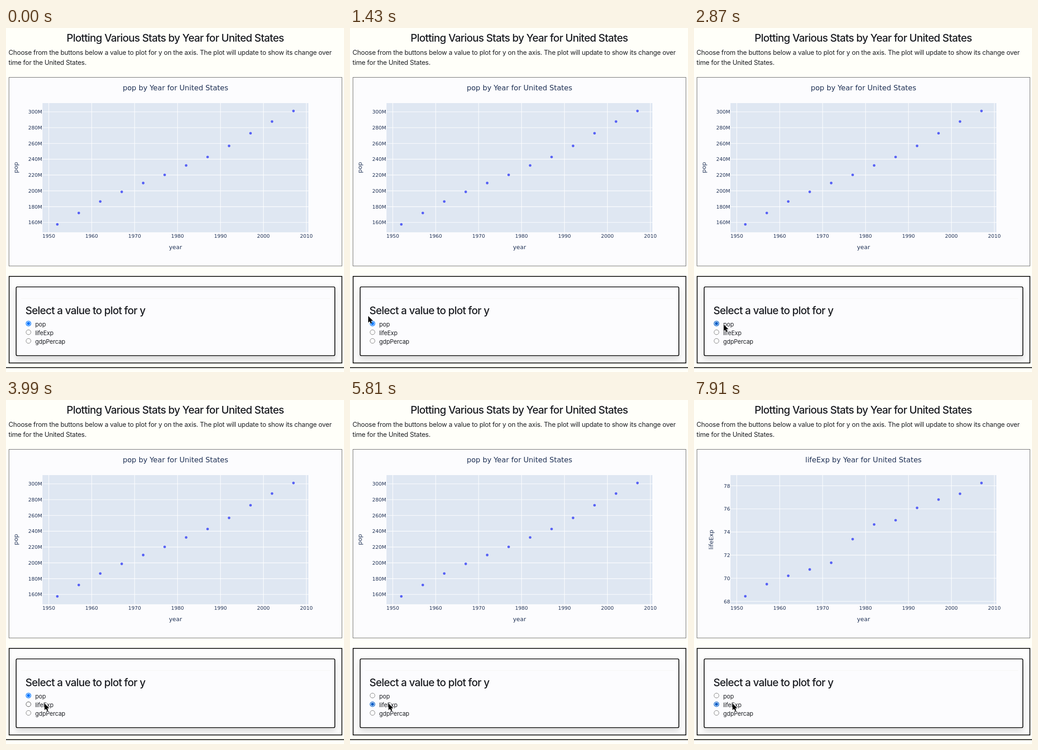
Animation, 741 px wide and 756 px high, one loop 8000 ms. Source, as an HTML page:

```html
<!DOCTYPE html>
<html lang="en">
<head>
<meta charset="utf-8">
<title>Stats by Year</title>
<style>
  html, body { margin: 0; width: 100%; height: 100%; overflow: hidden; background: #fffff9; }
  svg { display: block; }
  text { font-family: Inter, sans-serif; font-optical-sizing: none; fill: #1b1d22; }
  .heading { font-size: 23px; font-weight: 500; letter-spacing: -0.8px; }
  .body { font-size: 14.3px; letter-spacing: -0.19px; }
  .option { font-size: 13px; letter-spacing: -0.15px; }
  .chart text { font-family: "DejaVu Sans", Verdana, sans-serif; font-size: 11px; fill: #203256; }
  .chart .title { font-size: 15.8px; }
  .chart .axis { font-size: 12.83px; }
  .middle { text-anchor: middle; }
  .end { text-anchor: end; }
  .grid { stroke: #fff; stroke-width: 1.1; }
  .card { filter: drop-shadow(0 7px 7px rgba(0, 0, 0, .15)); }
</style>
</head>
<body>
<svg id="stage" width="741" height="756" viewBox="0 0 741 756">
  <text class="heading middle" x="371" y="30">Plotting Various Stats by Year for United States</text>
  <text class="body" x="5.5" y="59">Choose from the buttons below a value to plot for y on the axis. The plot will update to show its change over</text>
  <text class="body" x="5.5" y="81">time for the United States.</text>

  <rect x="6.5" y="108.5" width="730" height="414.5" fill="#fcfcfe" stroke="#666"/>
  <g class="chart" id="charts"></g>

  <rect x="6.8" y="545.8" width="729.6" height="190.4" fill="#fdfdfd" stroke="#000" stroke-width="1.7"/>
  <rect class="card" x="22.3" y="569" width="698.6" height="151" rx="2.5" fill="#fcfcfe" stroke="#000" stroke-width="1.7"/>
  <path d="M33 594.5H711" stroke="#f6f6f3"/>
  <text class="heading" x="42.5" y="628.5">Select a value to plot for y</text>
  <g id="options"></g>
  <path d="M0 746.3H741" stroke="#000" stroke-width="1.7"/>
  <path id="cursor" d="M0 0V14.6L3.3 11.5 5.5 16.6 8 15.5 5.9 10.6H10.4Z" fill="#000" stroke="#fff" stroke-width="1" paint-order="stroke"/>
</svg>
<script>
const LOOP = 8000, SELECT_AT = 5600, REDRAW_AT = 5860;
const byId = id => document.getElementById(id);

function add(parent, tag, attrs, label = '') {
  const node = document.createElementNS('http://www.w3.org/2000/svg', tag);
  for (const [key, value] of Object.entries(attrs)) node.setAttribute(key, value);
  node.textContent = label;
  parent.append(node);
  return node;
}

const yearX = year => 93.7 + (year - 1950) * 9.413;

function buildChart({ name, values, from, to, step, baseY, scale, unit, labelX }) {
  const chart = add(byId('charts'), 'g', {});
  const valueY = value => baseY - (value - from) * scale;
  add(chart, 'rect', { x: 80, y: 165, width: 583, height: 284, fill: '#dfe7f2' });
  for (let year = 1950; year <= 2010; year += 10) {
    const x = yearX(year);
    add(chart, 'path', { class: 'grid', d: `M${x} 165V449` });
    add(chart, 'text', { class: 'middle', x, y: 461 }, year);
  }
  for (let value = from; value <= to; value += step) {
    const y = valueY(value);
    add(chart, 'path', { class: 'grid', d: `M80 ${y}H663` });
    add(chart, 'text', { class: 'end', x: 79.2, y: y + 4 }, value + unit);
  }
  values.forEach((value, i) => add(chart, 'circle', {
    cx: yearX(1952 + 5 * i), cy: valueY(value), r: 2.8, fill: '#5862f5'
  }));
  add(chart, 'text', { class: 'title middle', x: 371.6, y: 137 }, `${name} by Year for United States`);
  add(chart, 'text', { class: 'axis middle', x: 371.6, y: 486 }, 'year');
  add(chart, 'text', { class: 'axis middle', transform: `translate(${labelX} 306.7) rotate(-90)` }, name);
  return chart;
}

const charts = [
  {
    name: 'pop', from: 160, to: 300, step: 20, baseY: 427.3, scale: 1.736, unit: 'M', labelX: 25.8,
    values: [157.6, 172, 186.5, 198.7, 209.9, 220.2, 232.2, 242.8, 256.9, 272.9, 287.7, 301.1]
  },
  {
    name: 'lifeExp', from: 68, to: 78, step: 2, baseY: 442.5, scale: 25.4, unit: '', labelX: 41.7,
    values: [68.44, 69.49, 70.21, 70.76, 71.34, 73.38, 74.65, 75.02, 76.09, 76.81, 77.31, 78.24]
  }
].map(buildChart);

const radios = ['pop', 'lifeExp', 'gdpPercap'].map((label, i) => {
  const cx = 49.3, cy = 649.5 + 19.1 * i, group = byId('options');
  add(group, 'text', { class: 'option', x: 64, y: 655.6 + 19.1 * i }, label);
  return {
    top: cy - 8, bottom: cy + 11,
    ring: add(group, 'circle', { cx, cy, r: 5.3, fill: '#fff' }),
    dot: add(group, 'circle', { cx, cy, r: 3.4 })
  };
});

// Pointer path: time, x, y
const path = [
  [500, -14, 610], [900, 12, 622], [1400, 40, 633], [2000, 40, 633],
  [2700, 65, 651.5], [3400, 65, 651.5], [3900, 84.5, 667]
];

function pointerAt(time) {
  const next = path.findIndex(key => key[0] > time);
  if (next === 0) return path[0].slice(1);
  if (next < 0) return path.at(-1).slice(1);
  const [t0, x0, y0] = path[next - 1], [t1, x1, y1] = path[next];
  const p = (time - t0) / (t1 - t0), eased = p * p * (3 - 2 * p);
  return [x0 + (x1 - x0) * eased, y0 + (y1 - y0) * eased];
}

function draw(now) {
  const time = now % LOOP;
  const [x, y] = pointerAt(time);
  const selected = time < SELECT_AT ? 0 : 1;
  const shown = time < REDRAW_AT ? 0 : 1;
  byId('cursor').setAttribute('transform', `translate(${x} ${y})`);
  charts.forEach((chart, i) => chart.setAttribute('visibility', i === shown ? 'visible' : 'hidden'));
  radios.forEach(({ top, bottom, ring, dot }, i) => {
    const hover = x > 43 && y >= top && y < bottom;
    const checked = i === selected;
    const blue = hover ? '#005cc8' : '#0075ff';
    ring.setAttribute('stroke', checked ? blue : hover ? '#444' : '#767676');
    ring.setAttribute('stroke-width', checked ? 1.3 : 1);
    dot.setAttribute('fill', checked ? blue : 'none');
  });
  requestAnimationFrame(draw);
}
requestAnimationFrame(draw);
</script>
</body>
</html>
```
